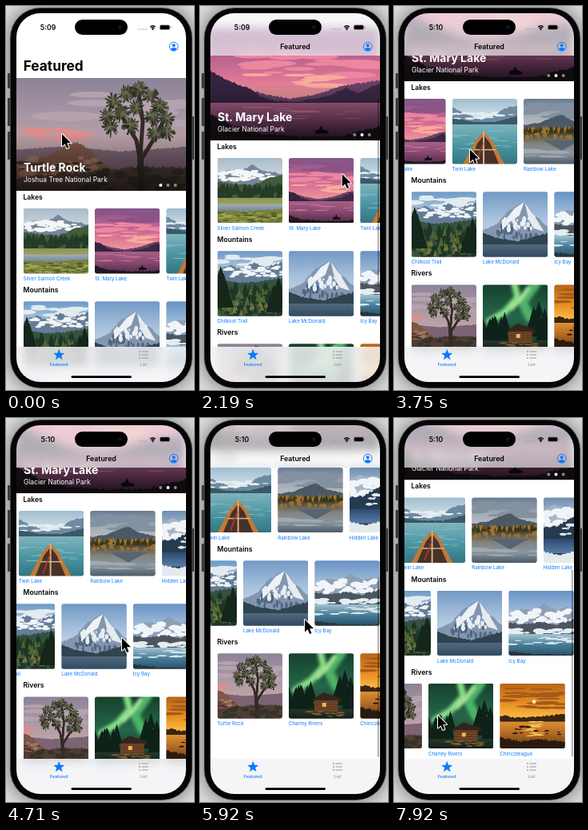
Recreate the animation shown at these times as an HTML page with a canvas. Size 235 px wide and 480 px high, loop 8 s.

```html
<!DOCTYPE html>
<html lang="en">
<head>
<meta charset="utf-8">
<title>Featured</title>
<style>
html, body { margin: 0; width: 100%; height: 100%; overflow: hidden; background: #ddd; }
canvas { display: block; }
</style>
</head>
<body>
<canvas id="stage" width="235" height="480"></canvas>
<script>
const LOOP = 8000, BLUE = '#0a7aff';
const stage = document.getElementById('stage');
const ctx = stage.getContext('2d');
const clamp = v => Math.max(0, Math.min(1, v));

// ---- Motion: smooth monotone curve through [time, value] keys
function track(...keys) {
  const rate = i => keys[i] && keys[i + 1] ? (keys[i + 1][1] - keys[i][1]) / (keys[i + 1][0] - keys[i][0]) : 0;
  const slope = i => { const a = rate(i - 1), b = rate(i); return a * b > 0 ? 2 * a * b / (a + b) : 0; };
  return t => {
    const i = keys.findLastIndex(k => k[0] <= t);
    if (i < 0) return keys[0][1];
    if (i === keys.length - 1) return keys[i][1];
    const [t0, a] = keys[i], [t1, b] = keys[i + 1], d = t1 - t0, u = (t - t0) / d, w = 1 - u;
    return a * w * w * (1 + 2 * u) + b * u * u * (3 - 2 * u) + d * u * w * (w * slope(i) - u * slope(i + 1));
  };
}
const scrollY = track([1950, 0], [2180, 60], [2400, 121], [2610, 135], [2790, 137], [5700, 137],
  [5920, 191], [5990, 193], [6200, 174], [6400, 159], [6610, 154.3], [7000, 153.6]);
const heroX = track([650, 0], [900, 85], [1150, 178], [1450, 212]);
const lakesX = track([3370, 0], [3600, 75], [3800, 138], [4180, 169], [4710, 184.5], [5500, 192.5]);
const mountainsX = track([4230, 0], [4500, 24], [4710, 41.5], [5050, 53], [5550, 57]);
const riversX = track([7580, 0], [7750, 36], [7920, 68]);
const cursorX = track([0, 70], [500, 202], [650, 202], [1000, 105], [1490, 140], [1830, 175], [2010, 175],
  [2400, 181], [3050, 181], [3140, 182], [3340, 182], [3650, 85], [4180, 190], [4270, 190], [4710, 145],
  [5050, 137], [5580, 131], [5920, 131], [6610, 167], [7130, 141], [7250, 141], [7480, 55]);
const cursorY = track([0, 160], [500, 207], [650, 207], [1000, 209], [1490, 282], [1830, 293], [1960, 293],
  [2380, 149], [3340, 149], [3650, 165], [4180, 261], [4270, 261], [4710, 275], [4900, 394], [5050, 366],
  [5580, 350], [5680, 350], [5920, 252], [6250, 310], [6610, 358], [7130, 360], [7250, 360], [7480, 372]);

// ---- Picture helpers, painting on the current picture g
let g, W, seed;
const rnd = () => (seed = seed * 16807 % 2147483647) / 2147483647;
function picture(w, h, paint) {
  const c = document.createElement('canvas');
  c.width = w * 2; c.height = h * 2;
  g = c.getContext('2d'); g.scale(2, 2);
  W = w; seed = 4242;
  paint();
  return c;
}
function band(y, h, ...colors) {
  const grad = g.createLinearGradient(0, y, 0, y + h);
  colors.forEach((c, i) => grad.addColorStop(i / Math.max(1, colors.length - 1), c));
  g.fillStyle = grad;
  g.fillRect(0, y, W, h);
}
function ridge(color, rough, base, ...p) {
  g.beginPath();
  g.moveTo(p[0], base);
  for (let i = 0; i < p.length - 2; i += 2) {
    const n = Math.ceil(Math.abs(p[i + 2] - p[i]) / 1.5);
    for (let j = 0; j <= n; j++)
      g.lineTo(p[i] + (p[i + 2] - p[i]) * j / n, p[i + 1] + (p[i + 3] - p[i + 1]) * j / n + (rnd() - .5) * 2 * rough);
  }
  g.lineTo(p[p.length - 2], base);
  g.fillStyle = color;
  g.fill();
}
function blobs(color, n, x, y, w, h, rx, ry) {
  g.fillStyle = color;
  while (n--) {
    const k = .5 + rnd();
    g.beginPath();
    g.ellipse(x + rnd() * w, y + rnd() * h, rx * k, ry * k, 0, 0, 7);
    g.fill();
  }
}
function firs(color, n, x, y, w, h, size) {
  g.fillStyle = color;
  while (n--) {
    const cx = x + rnd() * w, top = y + rnd() * h, s = size * (.6 + rnd() * .6);
    g.beginPath();
    g.moveTo(cx, top); g.lineTo(cx + s * .3, top + s); g.lineTo(cx - s * .3, top + s);
    g.fill();
  }
}
function poly(color, ...p) {
  g.beginPath();
  for (let i = 0; i < p.length; i += 2) g.lineTo(p[i], p[i + 1]);
  g.fillStyle = color;
  g.fill();
}
function line(color, width, ...p) {
  g.beginPath();
  for (let i = 0; i < p.length; i += 2) g.lineTo(p[i], p[i + 1]);
  g.strokeStyle = color; g.lineWidth = width; g.lineJoin = g.lineCap = 'round';
  g.stroke();
}
function burst(color, n, x, y, r) {
  while (n--) {
    const a = rnd() * 6.3, k = r * (.5 + rnd() * .5);
    line(color, 1.2, x, y, x + Math.cos(a) * k, y + Math.sin(a) * k);
  }
}

// ---- Pictures
const turtleRock = picture(212, 141, () => {
  band(0, 141, '#8d8297', '#a797a5', '#c0a3a8', '#c99b94');
  blobs('#b5a2ac', 12, 60, 15, 150, 50, 30, 4);
  blobs('#dd8e8c', 16, 5, 62, 75, 15, 14, 2);
  ridge('#7c6474', .8, 141, 0, 90, 60, 85, 130, 92, 212, 86);
  ridge('#7d5647', 1.5, 141, 0, 112, 18, 102, 40, 97, 60, 85, 76, 80, 90, 88, 104, 103, 130, 120);
  blobs('#a0765f', 34, 8, 100, 92, 25, 5, 3);
  blobs('#4c342e', 30, 5, 104, 100, 30, 6, 1.5);
  ridge('#4f3d37', 2, 141, 0, 126, 100, 116, 160, 110, 212, 112);
  blobs('#363326', 45, 80, 114, 132, 26, 6, 3);
  line('#352b25', 8, 156, 141, 155, 100);
  line('#352b25', 5, 155, 105, 150, 78, 132, 48);
  line('#352b25', 5, 155, 95, 158, 55, 153, 22);
  line('#352b25', 5, 156, 102, 172, 76, 184, 54);
  for (const [x, y] of [[114, 48], [121, 30], [138, 20], [153, 15], [167, 22], [179, 36], [187, 51],
    [188, 68], [170, 49], [150, 38], [132, 45], [143, 60], [174, 70], [118, 62]]) {
    burst('#2a2d22', 38, x, y, 12);
    burst('#4c503a', 24, x, y - 1, 10);
    burst('#6d6c4f', 7, x, y - 2, 9);
  }
});
const stMary = picture(212, 141, () => {
  band(0, 95, '#80578a', '#b0628f', '#dd7596', '#f0a09c');
  blobs('#8c5387', 16, 0, 2, 212, 26, 26, 3);
  blobs('#ef86a0', 18, 20, 32, 180, 30, 24, 3);
  blobs('#f8ac9c', 10, 55, 58, 110, 20, 18, 2);
  ridge('#674165', 1, 97, 0, 62, 36, 74, 70, 84, 100, 89, 135, 83, 168, 72, 212, 66);
  ridge('#35233f', 1, 97, 0, 54, 20, 65, 36, 72, 49, 76, 62, 86, 82, 92, 150, 94, 212, 94);
  ridge('#3b2744', 1, 97, 95, 95, 128, 89, 150, 85, 169, 75, 184, 82, 212, 70);
  band(94, 47, '#a85f86', '#86486f', '#4d2c4a');
  blobs('#c57596', 14, 50, 98, 130, 16, 16, .6);
  ridge('#21161f', 1.5, 141, 0, 108, 28, 122, 65, 133, 120, 136, 160, 136, 212, 124);
  blobs('#140d16', 5, 131, 129, 12, 3, 5, 1.5);
  poly('#140d16', 134, 130, 139, 122, 141, 130);
});
const silverSalmon = picture(82, 82, () => {
  band(0, 30, '#a9bccb', '#d8dfe3');
  ridge('#75869a', 1, 45, 0, 22, 15, 14, 30, 17, 44, 8, 58, 16, 82, 20);
  blobs('#f4f6f7', 40, 4, 16, 66, 12, 5, 1.6);
  ridge('#435c3c', 1.2, 55, 0, 30, 25, 33, 45, 34, 66, 25, 82, 22);
  firs('#243b27', 80, 0, 30, 82, 12, 11);
  band(50, 10, '#87945b', '#a4a45d');
  band(58, 9, '#9fb0b8', '#718894');
  ridge('#77803d', 1, 82, 0, 66, 40, 67, 82, 64);
  blobs('#a5a452', 50, 0, 69, 82, 12, 4, .7);
  blobs('#4e612e', 45, 0, 68, 82, 14, 3, .7);
});
const twinLake = picture(82, 82, () => {
  band(0, 30, '#9fbdd0', '#e4ebee');
  ridge('#6c8aa0', 1, 40, 0, 10, 16, 18, 35, 26, 48, 24, 64, 13, 82, 8);
  blobs('#e7eef1', 20, 0, 17, 82, 8, 5, 1);
  ridge('#3b5866', .6, 40, 0, 25, 30, 29, 55, 29, 82, 22);
  band(32, 50, '#7fb4bd', '#4d97a5', '#347583');
  blobs('#86b9c0', 25, 0, 36, 82, 35, 8, .5);
  poly('#c07a37', 40, 41, 30, 52, 14, 82, 66, 82, 50, 52);
  poly('#483129', 40, 46, 32, 56, 21, 82, 59, 82, 48, 56);
  line('#d8b185', 2, 40, 42, 40, 82);
  line('#d9b68c', 1.5, 28, 64, 54, 64);
  line('#9c3b2c', 2, 31, 78, 39, 56);
});
const rainbowLake = picture(82, 82, () => {
  band(0, 42, '#687d94', '#a3adb7', '#c9c9c5');
  blobs('#8391a0', 18, 0, 4, 82, 20, 14, 2);
  ridge('#4b5967', .6, 45, 0, 33, 20, 30, 38, 23, 48, 20, 60, 27, 82, 32);
  ridge('#6b5127', 1, 45, 0, 36, 40, 37, 82, 35);
  firs('#a9742b', 45, 0, 33, 82, 4, 8);
  firs('#33381e', 45, 0, 34, 82, 4, 8);
  band(43, 39, '#4f452d', '#81827d', '#8996a2', '#4c5a66');
  blobs('#967136', 30, 0, 44, 82, 5, 2, 2);
  poly('#586470', 24, 52, 48, 65, 72, 52);
  blobs('#a2a9af', 14, 0, 63, 82, 10, 12, 1);
});
const hiddenLake = picture(82, 82, () => {
  band(0, 30, '#6f8eb0', '#c1cfdb');
  ridge('#a6b6c8', 1.5, 82, 0, 16, 14, 8, 28, 15, 50, 24, 82, 12);
  blobs('#f1f4f7', 38, 0, 15, 82, 20, 6, 3);
  ridge('#263a50', 1.5, 82, 0, 38, 18, 36, 38, 24, 60, 32, 82, 22);
  blobs('#dfe6ec', 14, 14, 34, 68, 14, 4, 1.5);
  band(52, 18, '#2c4a70', '#587da5');
  ridge('#e4e9ee', 1, 82, 0, 68, 20, 72, 50, 66, 82, 71);
});
const chilkoot = picture(82, 82, () => {
  band(0, 30, '#6d9ac6', '#bfd3e3');
  blobs('#e3ebf1', 16, 0, 5, 82, 13, 10, 2);
  ridge('#647c96', 1.5, 50, 0, 26, 14, 18, 30, 22, 46, 15, 60, 21, 82, 14);
  blobs('#f0f4f7', 40, 5, 20, 77, 12, 4, 1.5);
  ridge('#34523d', 1, 82, 0, 36, 25, 40, 50, 39, 82, 34);
  firs('#1f3525', 90, 0, 36, 82, 34, 14);
  firs('#4e6335', 45, 0, 44, 82, 28, 10);
  firs('#757440', 18, 10, 56, 70, 18, 8);
  firs('#15261b', 4, 2, 18, 10, 12, 40);
  firs('#15261b', 4, 70, 32, 12, 12, 30);
});
const mcDonald = picture(82, 82, () => {
  band(0, 66, '#7299c4', '#a8c2dd', '#d5dfe8');
  ridge('#8296af', 1, 68, 0, 48, 18, 40, 32, 24, 44, 17, 52, 12, 64, 28, 82, 44);
  poly('#eef2f6', 52, 13, 46, 30, 34, 38, 18, 55, 24, 41, 40, 21);
  poly('#e4eaf0', 53, 14, 66, 32, 77, 50, 64, 46, 58, 36);
  blobs('#52677f', 30, 18, 40, 50, 18, 1.5, 4);
  blobs('#e8edf2', 24, 22, 32, 46, 20, 2, 3);
  ridge('#2f4350', 1, 70, 0, 52, 20, 59, 45, 62, 82, 52);
  band(66, 16, '#536b80', '#324a60');
});
const icyBay = picture(82, 82, () => {
  band(0, 40, '#6792c5', '#bdd1e3');
  ridge('#8ca0b5', 1.5, 60, 0, 32, 16, 22, 30, 25, 46, 16, 60, 24, 82, 20);
  blobs('#f2f5f8', 50, 0, 25, 82, 15, 5, 2.5);
  ridge('#4c5661', 1.5, 60, 0, 40, 18, 43, 40, 40, 60, 43, 82, 36);
  blobs('#e6edf2', 45, 0, 49, 82, 5, 5, 1.5);
  band(55, 27, '#a2c4d1', '#477d97', '#28516a');
  blobs('#d7e5ec', 18, 0, 58, 82, 10, 6, .8);
  ridge('#29343a', 1, 82, 0, 76, 30, 80, 82, 81);
});
const charley = picture(82, 82, () => {
  band(0, 82, '#16412d', '#26674a', '#163427');
  g.filter = 'blur(4px)';
  line('#4fb368', 12, 66, 0, 50, 22, 60, 42);
  line('#8be28a', 8, 40, 0, 44, 16, 28, 34, 8, 46);
  line('#c0f5a9', 4, 58, 4, 46, 20, 36, 30);
  g.filter = 'none';
  firs('#0e2219', 24, 0, 34, 28, 22, 26);
  firs('#0e2219', 18, 62, 20, 20, 28, 30);
  band(70, 12, '#27382a', '#13201a');
  poly('#35241b', 29, 58, 44, 49, 66, 56, 66, 61);
  poly('#734729', 32, 59, 62, 59, 62, 73, 32, 73);
  for (let y = 61; y < 73; y += 3) line('#49301f', .7, 32, y, 62, y);
  poly('#f3b35a', 42, 62, 47, 62, 47, 67, 42, 67);
  blobs('#7a5a30', 18, 26, 73, 42, 6, 4, .8);
});
const chincoteague = picture(82, 82, () => {
  band(0, 46, '#b86618', '#e58a1e', '#ffc14a');
  blobs('#a55a1d', 18, 0, 3, 82, 28, 14, 1.3);
  blobs('#ffe9a4', 1, 43, 23, 0, 0, 5, 5);
  band(44, 38, '#e89a38', '#b36a25', '#5c351b');
  ridge('#3a2413', 1.3, 48, 0, 40, 25, 43, 50, 42, 82, 38);
  blobs('#ffd061', 20, 34, 48, 18, 18, 5, .6);
  ridge('#2a1b10', 1.5, 82, 0, 68, 25, 73, 50, 70, 82, 74);
  blobs('#21150d', 12, 8, 54, 70, 10, 3, .9);
});

// ---- Drawing on the stage
function text(s, x, y, size, weight, color, align = 'left') {
  ctx.font = `${weight} ${size}px Inter, sans-serif`;
  ctx.fillStyle = color;
  ctx.textAlign = align;
  ctx.fillText(s, x, y);
}
function pill(x, y, w, h, r, color, c = ctx) {
  c.beginPath();
  c.roundRect(x, y, w, h, r);
  c.fillStyle = color;
  c.fill();
}
const disc = (x, y, r, color) => pill(x - r, y - r, 2 * r, 2 * r, r, color);

// crop: x, y, width, height inside the picture
function card(pic, x, y, w, h, r, crop) {
  ctx.save();
  ctx.beginPath(); ctx.roundRect(x, y, w, h, r); ctx.clip();
  ctx.drawImage(pic, ...crop.map(v => v * 2), x, y, w, h);
  ctx.restore();
}
function frost(y, h, white, alpha) {
  if (!alpha) return;
  ctx.save();
  ctx.beginPath(); ctx.rect(0, y, 235, h); ctx.clip();
  ctx.globalAlpha = alpha;
  ctx.filter = 'blur(6px)';
  ctx.drawImage(stage, 0, 0);
  ctx.filter = 'none';
  ctx.fillStyle = `rgba(244,244,246,${white})`;
  ctx.fillRect(0, y, 235, h);
  ctx.restore();
}

const heroes = [[turtleRock, 'Turtle Rock', 'Joshua Tree National Park'], [stMary, 'St. Mary Lake', 'Glacier National Park']];
const square = [0, 0, 82, 82];
const rows = [
  ['Lakes', lakesX, [[silverSalmon, 'Silver Salmon Creek'], [stMary, 'St. Mary Lake', [35.5, 0, 141, 141]],
    [twinLake, 'Twin Lake'], [rainbowLake, 'Rainbow Lake'], [hiddenLake, 'Hidden Lake']]],
  ['Mountains', mountainsX, [[chilkoot, 'Chilkoot Trail'], [mcDonald, 'Lake McDonald'], [icyBay, 'Icy Bay']]],
  ['Rivers', riversX, [[turtleRock, 'Turtle Rock', [70, 0, 141, 141]], [charley, 'Charley Rivers'], [chincoteague, 'Chincoteague']]]
];

function drawHero(t, y) {
  const shift = heroX(t);
  heroes.forEach(([pic, title, park], i) => {
    const x = 13 + i * 212 - shift;
    ctx.drawImage(pic, x, y, 212, 141);
    const shade = ctx.createLinearGradient(0, y + 141, 0, y + 70);
    shade.addColorStop(0, 'rgba(0,0,0,.6)');
    shade.addColorStop(1, 'rgba(0,0,0,0)');
    ctx.fillStyle = shade;
    ctx.fillRect(x, y, 212, 141);
    text(title, x + 9, y + 117, 14, 700, '#fff');
    text(park, x + 9, y + 130, 8.45, 400, '#fff');
  });
  for (let i = 0; i < 3; i++)
    disc(193.3 + i * 9.2, y + 134, 2, i === (shift > 106 ? 1 : 0) ? '#fff' : 'rgba(255,255,255,.5)');
}

function drawRows(t, y) {
  rows.forEach(([title, offset, items], i) => {
    const top = y + i * 116.2, shift = offset(t);
    text(title, 21.5, top + 11, 8.6, 600, '#000');
    items.forEach(([pic, name, crop = square], j) => {
      const x = 21.5 + j * 89.4 - shift;
      card(pic, x, top + 22, 81.5, 81.5, 3, crop);
      text(name, x, top + 112, 6.2, 400, BLUE);
    });
  });
}

function drawStatus(t) {
  text(t < 3700 ? '5:09' : '5:10', 52.5, 30, 8.7, 600, '#000', 'center');
  pill(86, 17, 66, 19, 9.5, '#000');
  disc(142.5, 26.5, 2.5, '#10131f');
  for (let i = 0; i < 4; i++) disc(166.3 + i * 2.9, 29, .75, '#999');
  ctx.strokeStyle = '#000';
  ctx.lineWidth = 1.4;
  for (const r of [2.8, 5]) {
    ctx.beginPath(); ctx.arc(183.5, 30, r, -2.3, -.85); ctx.stroke();
  }
  disc(183.5, 29.3, 1, '#000');
  pill(192, 23.5, 13, 6.4, 2, '#888');
  pill(192.8, 24.3, 11.4, 4.8, 1.4, '#000');
  pill(205.5, 25.6, 1, 2.2, .5, '#888');
}

function drawProfile() {
  ctx.save();
  ctx.beginPath(); ctx.arc(209.7, 50.7, 5.4, 0, 7);
  ctx.strokeStyle = BLUE; ctx.lineWidth = 1; ctx.stroke(); ctx.clip();
  disc(209.7, 49.2, 2, BLUE);
  disc(209.7, 56, 4, BLUE);
  ctx.restore();
}

function drawTabs() {
  ctx.beginPath();
  for (let i = 0; i < 10; i++) {
    const r = i % 2 ? 3.1 : 7.4, a = i * Math.PI / 5 - Math.PI / 2;
    ctx.lineTo(66.2 + r * Math.cos(a), 436.2 + r * Math.sin(a));
  }
  ctx.fillStyle = BLUE;
  ctx.fill();
  text('Featured', 66.2, 449.5, 5.4, 500, BLUE, 'center');
  for (let y = 432; y < 441; y += 4) {
    disc(167, y, .9, '#999');
    pill(169.5, y - .5, 8.5, 1, .5, '#999');
  }
  text('List', 172, 449.5, 5.4, 500, '#999', 'center');
  pill(81.5, 462.3, 75.5, 2.6, 1.3, '#000');
}

function drawCursor(x, y) {
  const p = [0, 0, 0, 15.5, 3.6, 12.2, 6.1, 18, 8.5, 17, 6.1, 11.3, 11, 11.1];
  ctx.beginPath();
  for (let i = 0; i < p.length; i += 2) ctx.lineTo(x + p[i], y + p[i + 1]);
  ctx.closePath();
  ctx.lineWidth = 2; ctx.strokeStyle = '#fff'; ctx.lineJoin = 'round';
  ctx.stroke();
  ctx.fillStyle = '#000';
  ctx.fill();
}

// Phone body with a hole for the screen
const bezel = document.createElement('canvas');
bezel.width = 235; bezel.height = 480;
{
  const b = bezel.getContext('2d');
  b.fillStyle = '#e0e0e0';
  b.fillRect(0, 0, 235, 480);
  b.shadowColor = 'rgba(0,0,0,.55)';
  b.shadowBlur = 26;
  pill(5, 2, 228, 476, 38, '#444', b);
  b.shadowBlur = 0; b.shadowColor = 'transparent';
  for (const [x, y, h] of [[2, 84, 19], [2, 115, 35], [2, 157, 35], [232, 138, 54]]) pill(x, y, 3.5, h, 1, '#3a3a3a', b);
  pill(6, 3, 226, 474, 37, '#050505', b);
  b.globalCompositeOperation = 'destination-out';
  pill(13, 9, 212, 461, 30, '#000', b);
}

function draw(t) {
  const y = scrollY(t), bar = clamp((y - 20) / 8);
  ctx.fillStyle = '#fff';
  ctx.fillRect(0, 0, 235, 480);
  drawHero(t, 90 - y);
  drawRows(t, 231 - y);
  frost(0, 62, .66, bar);
  frost(426, 54, .84, 1);
  if (y < 40) {
    ctx.save();
    ctx.beginPath(); ctx.rect(13, 62 - 20 * (1 - bar), 212, 80); ctx.clip();
    text('Featured', 21.7, 81 - y, 17.3, 700, '#000');
    ctx.restore();
  }
  ctx.globalAlpha = clamp((y - 24) / 10);
  text('Featured', 119, 54, 8.8, 600, '#000', 'center');
  ctx.globalAlpha = 1;
  if (t > 2010 && t < 3140 || t > 5700) {
    const top = 66 + 124 * Math.min(1, y / 154) + Math.max(0, y - 154) * .3;
    pill(222, top, 1.6, top > 190 ? 424 - top : 234, .8, 'rgba(0,0,0,.38)');
  }
  drawStatus(t);
  drawProfile();
  drawTabs();
  ctx.drawImage(bezel, 0, 0);
  drawCursor(cursorX(t), cursorY(t));
}

function loop() {
  draw(performance.now() % LOOP);
  requestAnimationFrame(loop);
}
loop();
</script>
</body>
</html>
```
